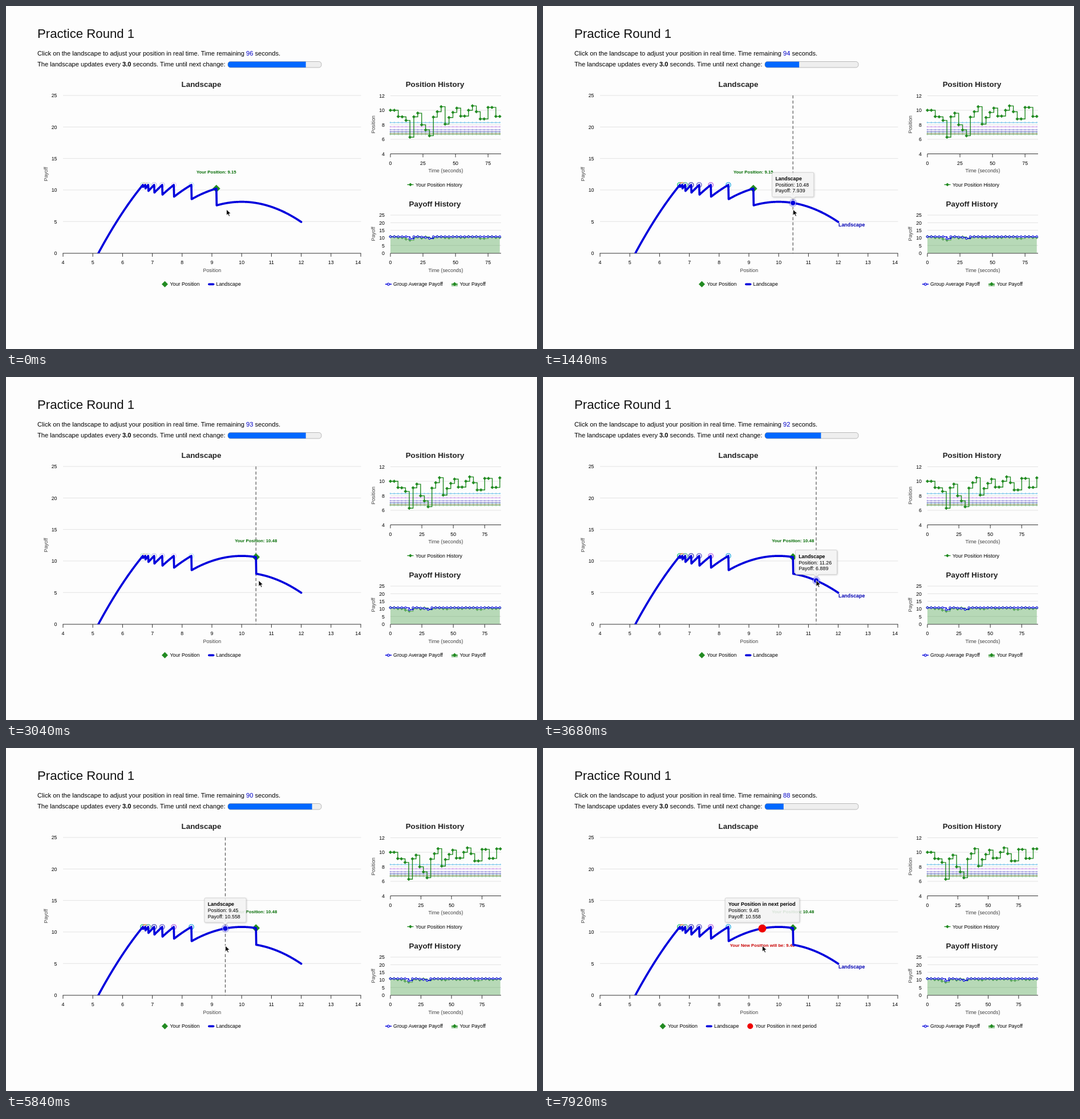
An HTML page for the animation above (8000 ms loop, 931 by 602 pixels).

```html
<!DOCTYPE html>
<html lang="en">
<head>
<meta charset="utf-8">
<title>Practice Round</title>
<style>
  html, body { margin: 0; width: 100%; height: 100%; overflow: hidden; background: #fdfdfd; }
  svg { display: block; width: 931px; height: 602px; font-family: "Liberation Sans", Arial, sans-serif; font-size: 8.9px; }
  .h1 { font-size: 22.2px; }
  .p { font-size: 11.13px; }
  .title { font-size: 13.4px; font-weight: bold; fill: #222; }
  .axis { fill: #444; }
  .tag { font-size: 7.76px; font-weight: bold; }
  .b { font-weight: bold; }
</style>
</head>
<body>
<svg viewBox="0 0 931 602">
  <defs>
    <clipPath id="histClip"><rect x="668" y="150" width="203" height="290"/></clipPath>
    <clipPath id="plotClip"><rect x="100" y="150" width="523" height="284"/></clipPath>
    <clipPath id="barClip"><rect x="389" y="97.5" width="164" height="10.5" rx="4.5"/></clipPath>
    <filter id="shadow" x="-20%" y="-20%" width="140%" height="150%">
      <feDropShadow dx="0.7" dy="0.7" stdDeviation="1" flood-opacity=".25"/>
    </filter>
  </defs>
  <g id="still"></g>
  <g id="live"></g>
</svg>
<script>
const LOOP = 8000, STEP = 80;
const GREEN = '#228b22', BLUE = '#0000dc', RED = '#f00000';

// Positions of the other players, with their colours
const others = [6.68, 6.76, 6.86, 7.06, 7.33, 7.72, 8.31];
const hues = ['#1fc06e', '#e8743b', '#4fae96', '#4040b0', '#6560cc', '#b566e0', '#2ca6e0'];
const valleys = [10.45, 10.2, 9.8, 9.54, 9.22, 8.9];

const myPositions = [10, 10, 9.13, 9.1, 8.6, 6.3, 9.1, 9.6, 8, 7.3, 6.5, 9.05, 9.8, 10.5, 8.1, 9, 9.7,
  10.3, 9.2, 9.2, 10, 10.6, 9.8, 8.8, 8.8, 10.4, 10.4, 9.15, 9.15, 10.48, 10.48];
const groupDips = { 5: 9.4, 8: 10.5, 9: 10.2, 10: 9.6 };

// Own position and payoff drop behind it, for each period
const periods = [{ pos: 9.15, drop: 2.677 }, { pos: 10.48, drop: 2.641 }, { pos: 10.48, drop: 2.641 }];

const cursorPath = [[0, 386.5, 357], [400, 386.5, 357], [1100, 438.4, 357], [2500, 438.4, 357],
  [2900, 443, 357], [3080, 443, 357], [3520, 479, 357], [4000, 479, 357], [4800, 391.2, 355],
  [5400, 384.5, 347], [8000, 384.5, 347]];

const X = p => 100 + (p - 4) * 52.2;
const Y = v => 433.5 - v * 11.06;
const posY = p => 259.5 - (p - 4) * 12.75;
const payY = v => 433.5 - v * 2.66;
const clamp = (v, a, b) => Math.min(b, Math.max(a, v));
const lerp = (a, b, u) => a + (b - a) * u;
const ease = u => (1 - Math.cos(Math.PI * clamp(u, 0, 1))) / 2;

const text = (x, y, s, attrs = '') => `<text x="${x}" y="${y}" ${attrs}>${s}</text>`;
const mid = 'text-anchor="middle"', end = 'text-anchor="end"';
const line = (x1, y1, x2, y2, color, attrs = '') =>
  `<line x1="${x1}" y1="${y1}" x2="${x2}" y2="${y2}" stroke="${color}" ${attrs}/>`;
const circle = (x, y, r, fill, attrs = '') => `<circle cx="${x}" cy="${y}" r="${r}" fill="${fill}" ${attrs}/>`;
const diamond = (x, y, r) => `<path d="M${x} ${y - r}l${r} ${r}l${-r} ${r}l${-r} ${-r}z" fill="${GREEN}"/>`;
const path = (d, color, attrs = '') => `<path d="${d}" fill="none" stroke="${color}" ${attrs}/>`;

// Arc through two points with fixed curvature
function arc(p, a, va, b, vb, bend) {
  return lerp(va, vb, (p - a) / (b - a)) + bend * (p - a) * (b - p);
}

function hill(p) {
  const i = others.findIndex(o => p <= o);
  if (i < 0) return 10.8 - 0.8 * (p - 10) ** 2;
  if (i === 0) return arc(p, 5.19, 0, others[0], 10.8, 1);
  return arc(p, others[i - 1], valleys[i - 1], others[i], 10.8, 0.8);
}

const payoff = (p, period) => hill(p) - (p > period.pos + 1e-6 ? period.drop : 0);

function cursorAt(t) {
  t = Math.max(0, t);
  const i = Math.max(1, cursorPath.findIndex(k => k[0] >= t));
  const [t0, x0, y0] = cursorPath[i - 1], [t1, x1, y1] = cursorPath[i];
  const u = (t - t0) / (t1 - t0);
  return [lerp(x0, x1, u), lerp(y0, y1, u)];
}

function drawStill() {
  let s = text(55, 56, 'Practice Round 1', 'class="h1" fill="#111"');
  s += text(55, 106.3, 'The landscape updates every <tspan class="b">3.0</tspan> seconds. Time until next change:', 'class="p"');
  s += text(342.5, 141.8, 'Landscape', `class="title" ${mid}`);
  s += text(752, 141.8, 'Position History', `class="title" ${mid}`);
  s += text(752, 351.6, 'Payoff History', `class="title" ${mid}`);
  for (let v = 0; v <= 25; v += 5) {
    if (v) s += line(100, Y(v), 622.5, Y(v), '#e3e3e3') + line(674, payY(v), 868, payY(v), '#e3e3e3');
    s += text(89.5, Y(v) + 3.4, v, end) + text(664, payY(v) + 3.4, v, end);
  }
  for (let v = 4; v <= 12; v += 2) {
    if (v > 4) s += line(674, posY(v), 868, posY(v), '#e3e3e3');
    s += text(664, posY(v) + 3.2, v, end);
  }
  s += line(99.5, 434, 622.5, 434, '#333');
  for (let p = 4; p <= 14; p++) {
    s += line(X(p), 434, X(p), 440, '#333');
    s += text(Math.min(X(p), 617.3), 453, p, mid);
  }
  s += text(361.3, 466.7, 'Position', `class="axis" ${mid}`);
  for (const y of [292, 466.7]) s += text(771, y, 'Time (seconds)', `class="axis" ${mid}`);
  for (const [x, y, name] of [[72.5, 295, 'Payoff'], [647, 208, 'Position'], [647, 400, 'Payoff']])
    s += text(0, 0, name, `class="axis" ${mid} transform="translate(${x} ${y}) rotate(-90)"`);
  s += line(703.5, 313.5, 714.5, 313.5, GREEN, 'stroke-width="1.4"') + diamond(709, 313.5, 3);
  s += text(718, 316.6, 'Your Position History');
  s += line(665, 488.3, 676, 488.3, BLUE, 'stroke-width="1.6"') + circle(670.5, 488.3, 1.9, '#fff', `stroke="${BLUE}" stroke-width="1.2"`);
  s += text(679, 491.2, 'Group Average Payoff');
  s += `<rect x="781" y="488" width="11" height="4" fill="${GREEN}" opacity=".45"/>`;
  s += line(781, 488, 792, 488, GREEN, 'stroke-width="1.4"') + diamond(786.5, 488, 3.6);
  s += text(795.5, 491.2, 'Your Payoff');
  return s;
}

function stepPath(xs, ys) {
  return xs.map((x, i) => i ? `H${x}V${ys[i]}` : `M${x} ${ys[i]}`).join('');
}

function drawHistory(cycle, since) {
  const last = 28 + cycle;
  const span = last * 3 + 1 - (1 - ease(since / 500)) * 3;
  const hx = sec => 674 + sec * 194 / span;
  const xs = Array.from({ length: last + 1 }, (_, i) => +hx(i * 3).toFixed(2));
  const mine = myPositions.slice(0, last + 1);
  const right = xs[last];
  let s = '';
  for (const base of [259.5, 434]) {
    s += line(674, base, 868, base, '#333');
    for (let sec = 0; sec <= 75; sec += 25)
      s += line(hx(sec), base, hx(sec), base + 6, '#333') + text(hx(sec), base + 19, sec, mid);
  }
  s += '<g clip-path="url(#histClip)">';
  others.forEach((o, i) => {
    const y = posY(o);
    s += `<g opacity=".55">` + line(674, y, right, y, hues[i], 'stroke-width="1.3"');
    for (const x of xs) s += circle(x, y, 1.3, hues[i]);
    s += '</g>';
  });
  const my = mine.map(posY);
  s += path(stepPath(xs, my), GREEN, 'stroke-width="1.4"');
  xs.forEach((x, i) => s += diamond(x, my[i], 3));

  const pay = mine.map(p => payY(hill(p)));
  const avg = mine.map((_, i) => payY(groupDips[i] || 10.78));
  s += `<path d="${stepPath(xs, pay)}V433.5H674z" fill="${GREEN}" fill-opacity=".32"/>`;
  s += '<g opacity=".6">' + path(stepPath(xs, pay), GREEN, 'stroke-width="1.3"');
  xs.forEach((x, i) => s += diamond(x, pay[i], 3));
  s += '</g>' + path(stepPath(xs, avg), BLUE, 'stroke-width="1.4"');
  xs.forEach((x, i) => s += circle(x, avg[i], 1.8, '#b9c6ee', `stroke="${BLUE}" stroke-width="1"`));
  return s + '</g>';
}

function drawLegend(three) {
  const [a, b] = three ? [210, 286] : [278.5, 354.5];
  let s = diamond(a, 488.3, 5.5) + text(a + 9, 491.2, 'Your Position');
  s += line(b + 1.5, 488.3, b + 9, 488.3, BLUE, 'stroke-width="3.8" stroke-linecap="round"') + text(b + 14, 491.2, 'Landscape');
  if (three) s += circle(363.3, 488.3, 5, RED) + text(372, 491.2, 'Your Position in next period');
  return s;
}

function drawTooltip(cx, y, tipX, w, name, p, v) {
  const l = cx - w / 2, r = cx + w / 2, t = y - 53.5, b = y - 10.7;
  const n = clamp(tipX, l + 7, r - 7);
  const d = `M${l + 2} ${t}H${r - 2}q2 0 2 2V${b - 2}q0 2 -2 2H${n + 4}L${n} ${b + 4}L${n - 4} ${b}H${l + 2}q-2 0 -2 -2V${t + 2}q0 -2 2 -2z`;
  return `<path d="${d}" fill="#f7f7f7" fill-opacity=".85" stroke="#c4c4c4" stroke-width=".7" filter="url(#shadow)"/>` +
    text(l + 5.7, t + 14, name, 'class="b"') +
    text(l + 5.7, t + 24.7, `Position: ${p.toFixed(2)}`) +
    text(l + 5.7, t + 35.3, `Payoff: ${v.toFixed(3)}`);
}

function drawCursor(x, y) {
  return `<path transform="translate(${x} ${y})" d="M0 0V10.6L2.5 8.3L4.3 12.2L6.1 11.4L4.4 7.6H7.8z" fill="#000" stroke="#fff" stroke-width=".9"/>`;
}

function draw(t) {
  const ticks = Math.floor((t + 40) / 100);
  const cycle = ticks < 25 ? 0 : ticks < 55 ? 1 : 2;
  const left = 25 - ticks + 30 * cycle;
  const seconds = Math.round((930 - 30 * cycle + left) / 10);
  const since = t + 540 - 3000 * cycle;
  const now = periods[cycle], before = periods[Math.max(0, cycle - 1)];
  const u = ease(since / 500);
  const land = p => lerp(payoff(p, before), payoff(p, now), u);

  const chosen = t >= 1600 && cycle === 0 ? 10.48 : t >= 5960 ? 9.45 : 0;
  const hovering = t >= 400 && (cycle === 0 || t >= 3080);
  const [mx, my] = cursorAt(t);
  const round2 = x => Math.round(((x - 100) / 52.2 + 4) * 100) / 100;

  let s = text(55, 87.3, `Click on the landscape to adjust your position in real time. Time remaining <tspan fill="#0000c8">${seconds}</tspan> seconds.`, 'class="p"');
  s += '<g clip-path="url(#barClip)"><rect x="389" y="97" width="164" height="12" fill="#eee"/>' +
    `<rect x="389" y="97" width="${164 * left / 30}" height="12" fill="#0068ff"/></g>` +
    '<rect x="389" y="97.5" width="164" height="10.5" rx="4.5" fill="none" stroke="#777" stroke-opacity=".6" stroke-width=".8"/>';
  s += drawHistory(cycle, since) + drawLegend(chosen);

  const hp = round2(mx), hx = X(hp), hy = Y(land(hp));
  const crossX = hovering && !chosen ? hx : cycle === 1 && !hovering ? X(10.48) : 0;
  if (crossX) s += line(crossX, 157, crossX, 434, '#555', 'stroke-width="1.2" stroke-dasharray="5.3 3.6"');

  others.forEach((o, i) =>
    s += circle(X(o), Y(10.8), 4.2, '#fff', `fill-opacity=".6" stroke="${hues[i]}" stroke-width="1.4" opacity="${hovering ? 1 : 0.3}"`));
  const dp = lerp(before.pos, now.pos, u);
  const dy = lerp(Y(hill(before.pos)), Y(hill(now.pos)), u);
  s += diamond(X(dp), dy, 6.8);
  s += text(X(dp), dy - 26, `Your Position: ${now.pos}`, `class="tag" fill="#006a00" ${mid}`);
  if (chosen) s += text(X(chosen), Y(land(chosen)) + 32.7, `Your New Position will be: ${chosen}`, `class="tag" fill="#c80000" ${mid}`);

  let d = '';
  for (let i = 519; i <= 1200; i++) d += `${d ? 'L' : 'M'}${X(i / 100).toFixed(2)} ${Y(land(i / 100)).toFixed(2)}`;
  s += '<g clip-path="url(#plotClip)">' + path(d, BLUE, 'stroke-width="3.7" stroke-linejoin="round" stroke-linecap="round"') + '</g>';
  const fade = clamp((since - 1000) / 200, 0, 1);
  if (fade) s += text(518, 387, 'Landscape', `class="b" fill="#0000b4" opacity="${fade}"`);

  if (chosen) {
    const cx = X(chosen), v = land(chosen);
    s += circle(cx, Y(v), 7, RED);
    s += drawTooltip(cx, Y(v), cx, 130.5, 'Your Position in next period', chosen, v);
  } else if (hovering) {
    s += circle(hx, hy, 7.2, BLUE, 'opacity=".25"') + circle(hx, hy, 4.6, BLUE, 'stroke="#fff" stroke-width=".8"');
    const lag = round2(cursorAt(t - 80)[0]);
    s += drawTooltip(X(lag), Y(land(lag)), hx, 73, 'Landscape', hp, land(hp));
  }
  return s + drawCursor(mx, my);
}

const live = document.getElementById('live');
document.getElementById('still').innerHTML = drawStill();
let shown = -1;
function frame() {
  const t = Math.floor(performance.now() % LOOP / STEP) * STEP;
  if (t !== shown) live.innerHTML = draw(shown = t);
  requestAnimationFrame(frame);
}
frame();
</script>
</body>
</html>
```
